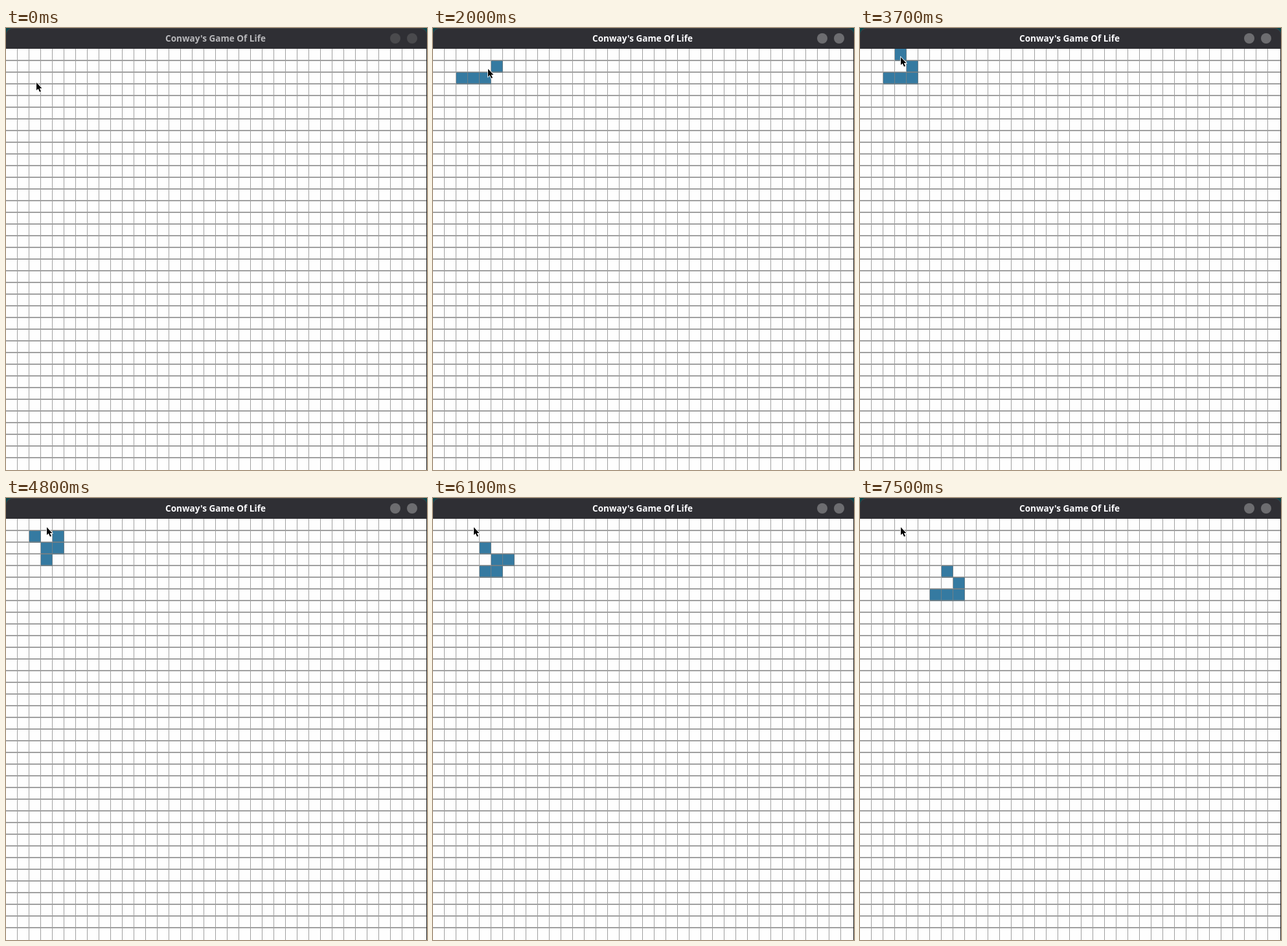
An HTML page with a canvas that plays this animation: 650x681 px, repeating every 8000 ms.

```html
<!DOCTYPE html>
<html lang="en">
<head>
<meta charset="utf-8">
<title>Conway's Game Of Life</title>
<style>
  html, body { margin: 0; width: 100%; height: 100%; overflow: hidden; }
  canvas { display: block; }
</style>
</head>
<body>
<canvas width="650" height="681"></canvas>
<script>
const ctx = document.querySelector('canvas').getContext('2d');
const W = 650, H = 681, TOP = 32, CELL = 18;
const LOOP = 8000, STEP = 100;
const START = 4800, GENERATION = 170, STALL_AT = 5500, STALL = 140;

// Pointer stops: time, x, y
const stops = [
  [200, 47, 84], [300, 47, 81], [800, 46, 80], [1200, 79, 83],
  [1400, 79, 85], [1800, 91, 65], [2000, 85, 63], [2300, 84, 62],
  [2600, 95, 58], [3000, 78, 61], [3300, 78, 61], [3700, 63, 45]
];
// Each click toggles the cell under the pointer
const clicks = [500, 1000, 1400, 1800, 2600, 3300, 3700];

const arrow = new Path2D('M0 0V12L2.7 9.5L5 14.6L7 13.7L4.8 8.9H8.4Z');
const clamp = (v, min, max) => Math.min(max, Math.max(min, v));

const grid = new Path2D();
for (let x = CELL - 1; x < W - CELL; x += CELL) grid.rect(x, TOP, 1, H);
for (let y = TOP + CELL - 1; y < H - CELL; y += CELL) grid.rect(0, y, W, 2);

function pointerAt(t) {
  const next = stops.findIndex(([time]) => time > t);
  if (next === 0) return stops[0].slice(1);
  if (next < 0) return stops.at(-1).slice(1);
  const [t0, x0, y0] = stops[next - 1], [t1, x1, y1] = stops[next];
  const p = (t - t0) / (t1 - t0), ease = p * p * (3 - 2 * p);
  return [x0 + (x1 - x0) * ease, y0 + (y1 - y0) * ease];
}

function nextGeneration(alive) {
  const counts = new Map();
  for (const key of alive) {
    const [col, row] = key.split(',').map(Number);
    for (let dx = -1; dx <= 1; dx++)
      for (let dy = -1; dy <= 1; dy++) {
        if (!dx && !dy) continue;
        const near = `${col + dx},${row + dy}`;
        counts.set(near, (counts.get(near) || 0) + 1);
      }
  }
  return new Set([...counts]
    .filter(([key, n]) => n === 3 || (n === 2 && alive.has(key)))
    .map(([key]) => key));
}

function cellsAt(t) {
  let alive = new Set();
  for (const time of clicks.filter(time => time <= t)) {
    const [x, y] = pointerAt(time);
    const key = `${Math.floor(x / CELL)},${Math.floor((y - TOP) / CELL)}`;
    if (!alive.delete(key)) alive.add(key);
  }
  const running = t - START - clamp(t - STALL_AT, 0, STALL);
  for (let age = 0; age <= running; age += GENERATION) alive = nextGeneration(alive);
  return alive;
}

function rect(color, x, y, w, h) {
  ctx.fillStyle = color;
  ctx.fillRect(x, y, w, h);
}

function drawBoard(t) {
  rect('#fefefe', 0, TOP, W, H - TOP);
  for (const key of cellsAt(t)) {
    const [col, row] = key.split(',');
    rect('#357aa1', col * CELL, TOP + row * CELL, CELL, CELL + 1);
  }
  ctx.fillStyle = 'rgba(128, 128, 128, 0.75)';
  ctx.fill(grid);
  rect('#1e2224', W - 1, TOP, 1, H);
}

function drawTitleBar(t) {
  const focus = clamp((t - 400) / 200, 0, 1);
  const grey = (from, to) => {
    const v = Math.round(from + (to - from) * focus);
    return `rgb(${v},${v},${v + 3})`;
  };
  const bar = (color, y) => {
    ctx.fillStyle = color;
    ctx.beginPath();
    ctx.roundRect(0, y, W, TOP, [10, 10, 0, 0]);
    ctx.fill();
  };
  rect('#0b464c', 0, 0, W, TOP);
  bar('#434347', 0);
  bar('#2f2f34', 1);
  rect('#29292d', 0, TOP - 1, W, 1);

  ctx.fillStyle = grey(74, 109);
  for (const x of [601, 627]) {
    ctx.beginPath();
    ctx.arc(x, 16, 8, 0, Math.PI * 2);
    ctx.fill();
  }
  ctx.fillStyle = grey(184, 252);
  ctx.font = '600 13.55px "Noto Sans", "Open Sans", sans-serif';
  ctx.textAlign = 'center';
  ctx.fillText("Conway's Game Of Life", 323.5, 21);
}

function drawPointer(t) {
  const [x, y] = pointerAt(t);
  ctx.save();
  ctx.translate(Math.round(x), Math.round(y));
  ctx.strokeStyle = '#fff';
  ctx.lineWidth = 1.6;
  ctx.stroke(arrow);
  ctx.fillStyle = '#000';
  ctx.fill(arrow);
  ctx.restore();
}

function frame() {
  const now = performance.now() % LOOP;
  const t = now - now % STEP;
  drawTitleBar(t);
  drawBoard(t);
  drawPointer(t);
  requestAnimationFrame(frame);
}
frame();
</script>
</body>
</html>
```
